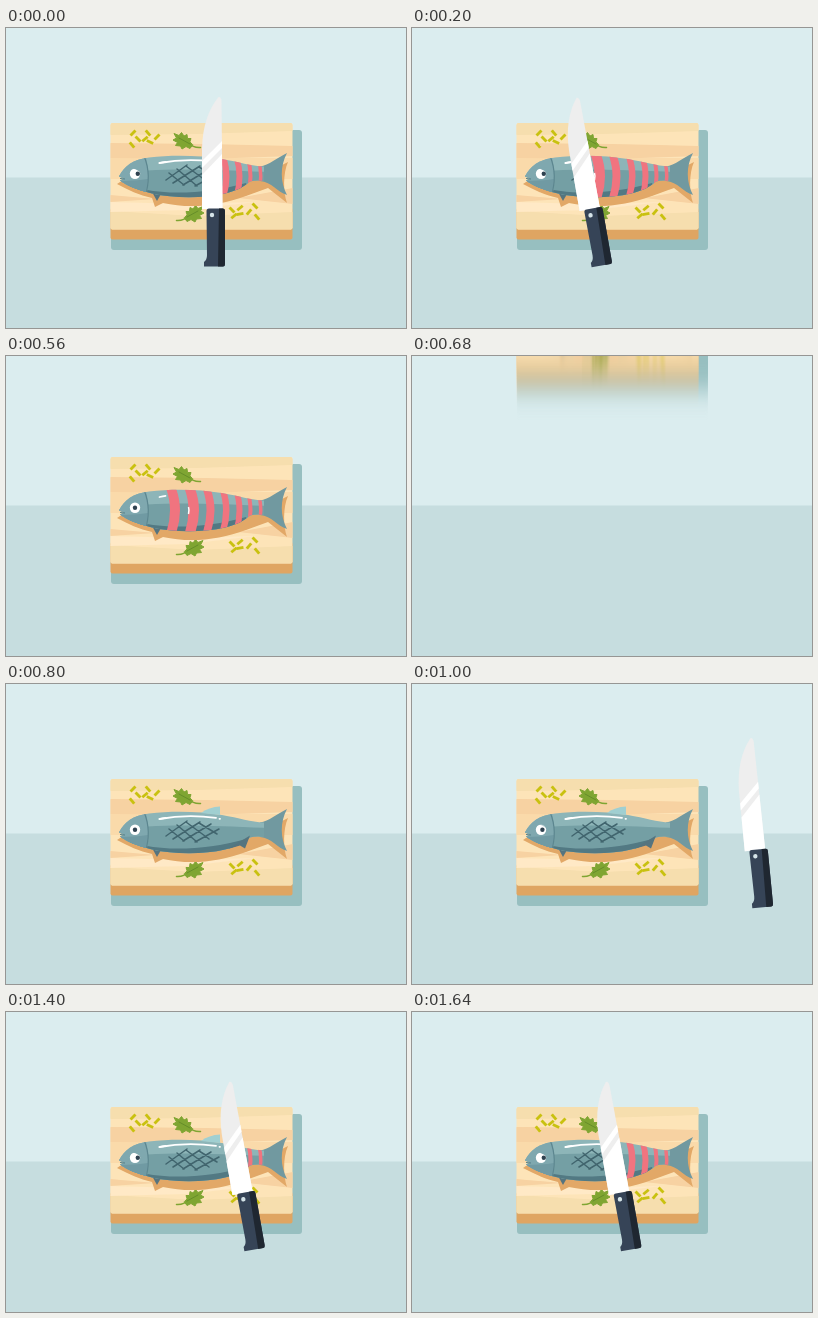
Animation, 400 px wide and 300 px high, one loop 1680 ms. Source, as an HTML page:

```html
<!DOCTYPE html>
<html lang="en">
<head>
<meta charset="utf-8">
<title>Slicing fish</title>
<style>
  html, body { margin: 0; width: 100%; height: 100%; overflow: hidden; background: #dbedef; }
  svg { display: block; width: 100vw; height: 100vh; }
</style>
</head>
<body>
<svg viewBox="0 0 400 300">
  <defs>
    <clipPath id="face"><rect x="104.5" y="95" width="182" height="106.5" rx="2"/></clipPath>
    <path id="body" d="M113 148.500C118 138 127 131.500 143 129.500C168 126.500 194 127.500 216 131C233 134 245 138 258 138.500L258 153Q250 152 244 153.500C238 159 230 163 219 165.500C198 170.500 168 170.500 146 165.500C131 162 120 157 114 152.500L118 150.500Z"/>
    <clipPath id="bodyClip"><use href="#body"/></clipPath>
    <clipPath id="left"><rect id="leftRect" x="0" y="0" width="400" height="300"/></clipPath>
    <clipPath id="right"><rect id="rightRect" x="400" y="0" width="400" height="300"/></clipPath>
    <filter id="blur" filterUnits="userSpaceOnUse" x="90" y="40" width="220" height="250" color-interpolation-filters="sRGB">
      <feGaussianBlur id="smear" stdDeviation="0 0"/>
    </filter>
    <g id="parsley" stroke="#7fa532" stroke-linejoin="round" stroke-linecap="round">
      <path fill="#7fa532" d="M186.500 117L184 120.500L180 118.500L176 121L174.500 118L169.500 117.500L171.500 114.500L167 112L170.500 110L168 105.500L173 107.500L175.500 104.500L178 108L181 106.500L181.500 110.500L185 110.500L184 113.500Z"/>
      <path fill="none" stroke-width="1.500" d="M183 115Q187 120 194.500 119.500"/>
      <path fill="none" stroke="#5f8728" stroke-width=".8" d="M173 110L184 116"/>
    </g>
  </defs>

  <rect width="400" height="300" fill="#dbedef"/>
  <rect y="149.500" width="400" height="150.500" fill="#c6dddf"/>

  <g id="board">
    <rect x="105" y="102" width="191" height="120" rx="3" fill="#97bfc0"/>
    <rect x="104.500" y="180" width="182" height="31.500" rx="2" fill="#dfa562"/>
    <g clip-path="url(#face)">
      <rect x="104" y="95" width="183" height="107" fill="#fde4b8"/>
      <rect x="104" y="130" width="183" height="21" fill="#fadaaa"/>
      <g fill="#f7d2a2">
        <path d="M104 115L200 116L287 118V128L200 131L104 130Z"/>
        <path d="M104 167L150 171L104 174Z"/>
        <path d="M287 160L232 170L287 176Z"/>
      </g>
      <g fill="#f6deae">
        <path d="M104 95H287V103L190 106L104 107Z"/>
        <path d="M104 183L190 188L287 184V202H104Z"/>
      </g>
      <path fill="#ffe9c6" d="M104 174L180 176L250 174L180 182L104 184Z"/>
    </g>
    <g id="grains" stroke="#c9c110" stroke-width="2.900"></g>
    <use href="#parsley"/>
    <use href="#parsley" transform="translate(365 73) scale(-1 1)"/>

    <path fill="#e2a867" d="M111 156C122 162 133 167 146 170L149 179L157 175C184 181 213 178 240 168L262 160L281 175C277 164 277 145 282 134L258 146L120 150Z"/>

    <path fill="#55747f" d="M146 164L151 173L155 166Z"/>
    <path fill="#7199a0" d="M254 138.500C263 137 271 130 281 125C274 138 274 154 281 167C271 164 266 154 254 153Z"/>
    <g clip-path="url(#bodyClip)">
      <rect x="105" y="120" width="160" height="60" fill="#8db5b8"/>
      <path fill="#749fa4" d="M105 149C140 138 200 142 262 144V180H105Z"/>
      <path fill="#527983" d="M112 153C140 167 190 169 240 155L250 180H112Z"/>
      <path fill="#7fa8af" d="M105 120H138Q146 147 139 175H105Z"/>
      <path fill="#709aa3" d="M105 152Q125 154 142 151L139 175H105Z"/>
      <path fill="none" stroke="#5c868f" stroke-width="1.200" d="M138 128Q146 147 139 169"/>
    </g>
    <path fill="none" stroke="#fff" stroke-width="1.800" stroke-linecap="round" d="M153.500 135Q157 134 159.500 133.800"/>

    <g clip-path="url(#left)">
      <path fill="#a0cfd1" d="M195 129Q203 123 214 122.500L214 131Z"/>
      <path fill="#55747f" d="M222 165L244 151.500L239 164.500L234 161.500Z"/>
      <path fill="none" stroke="#fff" stroke-width="1.800" stroke-linecap="round" d="M153.500 135Q180 130 210 133.800M213.500 134.800h.5"/>
      <path fill="none" stroke="#41656e" stroke-width="1.500" stroke-linecap="round" d="M160 152L181 137M167 155L194 138M177 157L205 140M189 158L213 145M163 145L178 157M171 141L191 158M180 138L203 155M193 139L211 150"/>
    </g>
    <g clip-path="url(#right)">
      <g id="cuts" clip-path="url(#bodyClip)" fill="#f0747f"></g>
      <path fill="none" stroke="#fff" stroke-width="1.500" d="M182.500 145Q183.500 148 182.500 152"/>
    </g>

    <circle cx="129" cy="145.700" r="5.200" fill="#fff"/>
    <circle id="pupil" cx="129" cy="145.700" r="2.200" fill="#2f4250"/>
    <path id="lid" fill="#7fa8af" d="M127 139.500H136V146Q132 141.500 127 140.500Z"/>
    <path fill="none" stroke="#55808a" d="M114 150.500L119 151"/>
  </g>

  <!-- drawn around its pivot -->
  <g id="knife">
    <g transform="translate(-206 -204)">
      <path fill="#eee" d="M212.500 69Q215 68.500 215.500 73L216.500 181H196V120Q197 88 212.500 69Z"/>
      <path fill="#fff" d="M196 133L216 113V120L196 140ZM196 147L216 126L216.500 181H196Z"/>
      <path fill="#364457" d="M203 180.500H217Q219 180.500 219 183V236Q219 238.500 217 238.500H198V234Q201 232 201 227L200.500 183Q200.500 180.500 203 180.500Z"/>
      <path fill="#1f2731" d="M213 180.500H217Q219 180.500 219 183V236Q219 238.500 217 238.500H212Z"/>
      <circle cx="206" cy="187" r="2.200" fill="#d5e4e8"/>
    </g>
  </g>
</svg>
<script>
const LOOP = 1680, STEP = 40, DRIFT = 0.1225;
const $ = id => document.getElementById(id);
const set = (id, name, value) => $(id).setAttribute(name, value);
const clamp = v => Math.max(0, Math.min(1, v));

// x, y, angle of each seed
const seeds = [
  [127, 105, -45], [126, 117, 50], [132, 111, 45], [142, 105, 50], [144, 114, 25], [151, 109, -45], [139, 111, -40],
  [226, 182, 45], [234, 180, -40], [234, 186, -10], [228, 188, -40], [243, 184, -50], [249, 178, 45], [251, 189, 50]
];
$('grains').innerHTML = seeds.map(([x, y, a]) =>
  `<path d="M-3.500 0H3.500" transform="translate(${x} ${y}) rotate(${a})"/>`).join('');

// left and right side of each cut surface
const cuts = [[159.5, 169.5], [178, 188.5], [196, 204], [212.5, 219], [226, 232], [238, 242], [248.5, 252]];
$('cuts').innerHTML = cuts.map(([a, b]) =>
  `<path d="M${a} 125Q${a + 9} 148 ${a} 173H${b}Q${b + 9} 148 ${b} 125Z"/>`).join('');

// time, vertical offset, smear
const boardKeys = [
  [0, 0, 0], [440, 0, 0], [560, 6, 0], [600, -18, 3], [640, -92, 10], [680, -187, 12],
  [720, -250, 12], [760, -70, 10], [800, 0, 0], [LOOP, 0, 0]
];

function boardAt(t) {
  const i = boardKeys.findIndex(k => k[0] > t);
  const a = boardKeys[i - 1], b = boardKeys[i];
  const p = (t - a[0]) / (b[0] - a[0]);
  return [a[1] + (b[1] - a[1]) * p, a[2] + (b[2] - a[2]) * p];
}

const rock = t => -3.33 - 6.67 * Math.cos((t - 80) / 120 * 2 * Math.PI);

function knifeAt(t) {
  if (t >= 1160) return { x: 206 + DRIFT * (LOOP - t), y: 204, a: rock(t) };
  if (t <= 240) return { x: 206 - DRIFT * t, y: 204, a: rock(t) };
  if (t < 600) {
    const p = clamp((t - 240) / 160);
    return { x: 176.6 - 210 * p ** 1.6, y: 204, a: rock(240) * (1 - p) };
  }
  const r = clamp((1160 - t) / 360);
  return { x: 269.7 + 144 * r ** 0.8, y: 204 - 60 * r * (1 - r), a: -10 * (1 - r) };
}

function draw(t) {
  const k = knifeAt(t);
  set('knife', 'transform', `translate(${k.x} ${k.y}) rotate(${k.a})`);
  set('knife', 'visibility', t >= 400 && t < 800 ? 'hidden' : 'visible');

  // the cut edge stays behind the blade
  const edge = t >= 400 && t < 720 ? 0 : Math.max(0, k.x + 56 * Math.sin(k.a * Math.PI / 180));
  set('leftRect', 'width', edge);
  set('rightRect', 'x', edge);

  const [y, smear] = boardAt(t);
  set('board', 'transform', `translate(0 ${y})`);
  set('smear', 'stdDeviation', `0 ${smear}`);
  if (smear) set('board', 'filter', 'url(#blur)');
  else $('board').removeAttribute('filter');

  const look = t < 600 ? 1 - clamp((t - 240) / 80) : clamp((t - 960) / 80);
  set('pupil', 'cx', 129 + 2.8 * look);
  set('lid', 'opacity', look);
}

const start = performance.now();
function tick() {
  const t = (performance.now() - start) % LOOP;
  draw(Math.floor(t / STEP) * STEP);
  requestAnimationFrame(tick);
}
tick();
</script>
</body>
</html>
```
